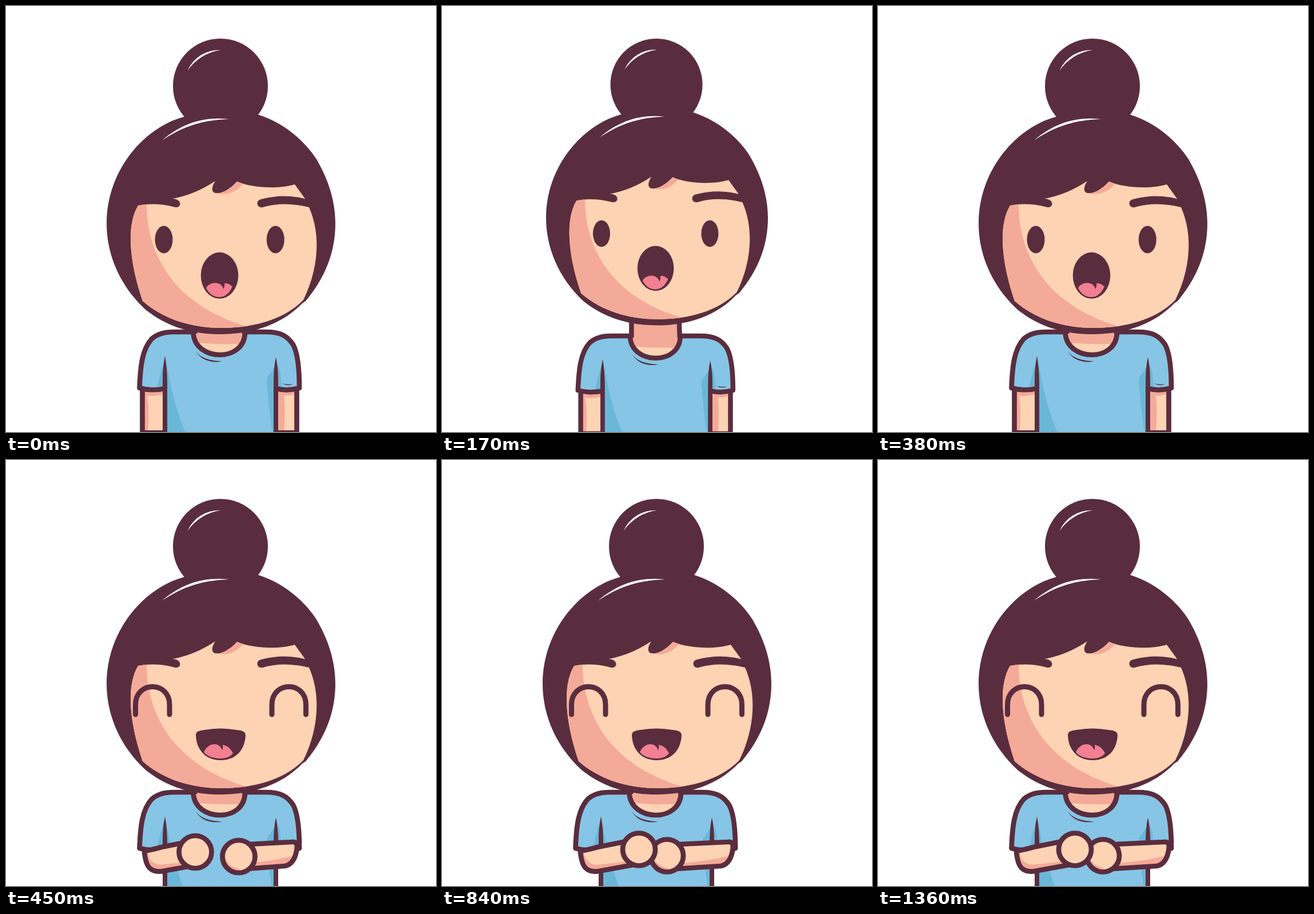
An HTML page that plays this animation: 752 px wide and 745 px high, repeating every 1490 ms.

```html
<!DOCTYPE html>
<html lang="en">
<head>
<meta charset="utf-8">
<title>Surprised, then happy</title>
<style>
  html, body { margin: 0; width: 100%; height: 100%; overflow: hidden; background: #fff; }
  svg { display: block; width: 100%; height: 100%; }
  .dark { fill: #5a2d3e; }
  .skin { fill: #fdd3b4; }
  .shade { fill: #f4aa98; }
  .shirt { fill: #86c5e6; }
  .fold { fill: #6ab7d7; }
  .tongue { fill: #f37f92; }
  .white { fill: #fff; }
  .line { fill: none; stroke: #5a2d3e; stroke-width: 8.7; stroke-linejoin: round; }
  .round { stroke-linecap: round; stroke-width: 9; }
</style>
</head>
<body>
<svg viewBox="0 0 752 745">
  <defs>
    <path id="face" d="M231 349 C212 380 213 440 239 516 C275 548 325 563 376 563
      C430 563 485 550 520 514 C544 466 553 404 530 352 L523 337 L505 312
      C475 321 430 318 404 307 C392 320 378 329 366 327 C358 325 360 315 366 306
      Q330 330 291 337 C308 337 308 353 296 352 Q262 343 231 349Z"/>
    <clipPath id="faceClip"><use href="#face"/></clipPath>
    <path id="collar" d="M327.500 572 C329 596 350 610 374 610 C398 610 417 596 418 572"/>
    <clipPath id="neckClip"><path d="M329 530 V572 C329 596 350 610 374 610 C398 610 417 596 417 572 V530Z"/></clipPath>
    <clipPath id="leftClip"><path id="leftArm"/></clipPath>
    <clipPath id="rightClip"><path id="rightArm"/></clipPath>
    <clipPath id="handClip"><circle r="29"/></clipPath>
  </defs>

  <g id="body">
    <g id="restArms">
      <path class="skin" d="M239 668 H278 V745 H239Z M472 668 H509 V745 H472Z"/>
      <path class="shade" d="M242 672 H275 V679 Q256 684 247 681 Q251 712 248 745 H242Z
        M476 672 H506 V678 Q495 682 486 681 Q489 712 486 745 H476Z"/>
      <path class="line" d="M238.500 668 V780 M508.500 668 V780"/>
      <path class="dark" d="M236 742 H278 V780 H236Z M472 742 H511 V780 H472Z"/>
    </g>
    <path class="shirt" d="M234 669 C235 630 238 600 255 582 C265 573 278 570 293 570 H455
      C480 570 492 577 502 592 C512 610 513 645 513 669 Q492 674 472 669 V780 H278 V669 Q254 674 234 669Z"/>
    <path class="fold" d="M276 622 Q268 648 264 671 H276Z M281 625 Q291 692 315 749 H281Z
      M469 632 L456 652 Q459 705 467 749 H469Z M475 625 Q483 650 481 671 H475Z"/>
    <path class="line" d="M278 669 Q254 674 233.500 668 C235 630 238 600 255 582 C265 573 278 570 293 570 H455
      C480 570 492 577 502 592 C512 610 513 645 513 668 Q492 674 472 669"/>
    <path class="dark" d="M278 612 Q282 632 282 660 V780 H274 V650 Q274 632 278 612Z
      M472 614 Q476 632 476 655 V780 H468 V660 Q468 632 472 614Z
      M483 660 Q492 663 502 661 Q492 666 483 660Z
      M331 602 C340 617 358 620 378 621.500 C360 625 340 620 331 602Z"/>
    <g clip-path="url(#neckClip)">
      <path class="skin" d="M320 520 H430 V620 H320Z"/>
      <path class="shade" d="M320 520 H430 V590 Q375 593 320 588Z"/>
    </g>
    <path class="line" d="M330 530 V573 M415.500 530 L417 573"/>
    <use href="#collar" class="line"/>
  </g>

  <g id="head">
    <circle class="dark" cx="375" cy="140" r="83"/>
    <path class="dark" d="M176 380 C176 303 222 232 290 201 C345 180 400 176 441 190
      C482 203 520 232 543 268 C563 302 576 340 576 380 C576 428 560 473 524 516
      L518 520 C480 560 425 574 376 574 C325 574 282 561 244 531 C205 495 176 442 176 380Z"/>
    <use href="#face" class="skin"/>
    <g clip-path="url(#faceClip)">
      <path class="shade" d="M200 300 H246 V347 C246 440 300 525 420 560 L300 600 H200Z
        M366 326 C385 334 405 324 417 308 L400 300Z"/>
    </g>
    <path class="dark" d="M530 352 Q485 341 449 352 C438 354 436 340 446 338 Q487 327 526 338Z"/>
    <path class="white" d="M317.500 113 A60 60 0 0 1 375 77 A85 85 0 0 0 317.500 113Z
      M273 235 C310 203 350 193 390 198 C345 199 310 210 273 235Z"/>
    <g id="surprised">
      <ellipse class="dark" cx="276" cy="408.500" rx="15.500" ry="24"/>
      <ellipse class="dark" cx="471.300" cy="408.500" rx="15.500" ry="24"/>
      <ellipse class="dark" cx="373.500" cy="471.300" rx="32.800" ry="40.500"/>
      <path class="tongue" d="M350 493 C356 483 370 482 376 488 Q379 490 380 495 Q383 491 382 485
        Q390 484 396 491 C390 503 383 509 373 509 C362 509 354 502 350 493Z"/>
    </g>
    <g id="happy" transform="translate(0 -11)">
      <path class="line round" d="M226.500 445 V428 C226.500 386 286 386 286 428 V445
        M465 445 V428 C465 386 524.500 386 524.500 428 V445"/>
      <path class="dark" d="M332 481 C332 474 340 473 347 472 Q375 467 403 472 C412 473 419 474 419 482
        C417 510 400 525 375 525 C350 525 333 508 332 481Z"/>
      <path class="tongue" d="M346 511 C352 497 366 494 373 500 Q377 503 378 508 Q380 504 379 498
        Q391 500 397 513 C392 519 385 522 375 522 C362 522 352 518 346 511Z"/>
    </g>
  </g>

  <g id="clapArms">
    <use href="#rightArm" class="skin"/>
    <path class="shade" clip-path="url(#rightClip)" d="M400 706 Q460 704 512 690 V725 H400Z"/>
    <use href="#rightArm" class="line"/>
    <use href="#leftArm" class="skin"/>
    <path class="shade" clip-path="url(#leftClip)" d="M236 684 H247 Q250 704 268 708 L345 700 V730 H236Z"/>
    <use href="#leftArm" class="line"/>
    <g id="rightHand">
      <circle class="skin" r="29"/>
      <path class="shade" clip-path="url(#handClip)" d="M-30 0 H-24 Q-20 17 2 22 V30 H-30Z"/>
      <circle class="line" r="28.500"/>
    </g>
    <g id="leftHand">
      <circle class="skin" r="29"/>
      <circle class="line" r="28.500"/>
    </g>
  </g>
</svg>
<script>
  const LOOP = 1490, HAPPY_AT = 450, CLAP = 130, DROP = 11;
  // [start, neck stretch from 0 to 1]
  const stretches = [[0, 0], [70, 0.5], [170, 1], [240, 0], [310, 1], [380, 0]];
  const el = id => document.getElementById(id);
  const show = (id, on) => el(id).setAttribute("display", on ? "inline" : "none");
  const move = (id, value) => el(id).setAttribute("transform", value);

  function placeHands(closed) {
    const [lx, ly, rx, ry] = closed ? [344.5, 681, 393.5, 692] : [331, 685.5, 407, 693.5];
    move("leftHand", `translate(${lx} ${ly})`);
    move("rightHand", `translate(${rx} ${ry})`);
    el("leftArm").setAttribute("d",
      `M242 684 Q244 712 256 717 Q264 721 274 719 L${lx} ${719 - 0.18 * (lx - 274)}
       V${677 - 0.2 * (lx - 272)} L272 677 Q258 681 242 684Z`);
    el("rightArm").setAttribute("d",
      `M500 668 Q509 667 509 677 Q506 706 488 710 L${rx} 716 V673Z`);
  }

  function draw(t) {
    const happy = t >= HAPPY_AT;
    const k = happy ? 0 : stretches.filter(s => s[0] <= t).pop()[1];
    const drop = happy ? DROP : 0;
    const scale = 1 - 0.03 * k;
    move("head", `translate(376 ${57 + drop}) scale(${scale}) translate(-376 -57)`);
    move("body", `translate(375 ${570 + 7 * k + drop}) scale(${scale}) translate(-375 -570)`);
    show("surprised", !happy);
    show("restArms", !happy);
    show("happy", happy);
    show("clapArms", happy);
    placeHands(happy && Math.floor((t - HAPPY_AT) / CLAP) % 2 === 1);
  }

  const start = performance.now();
  function tick() {
    draw((performance.now() - start) % LOOP);
    requestAnimationFrame(tick);
  }
  tick();
</script>
</body>
</html>
```
